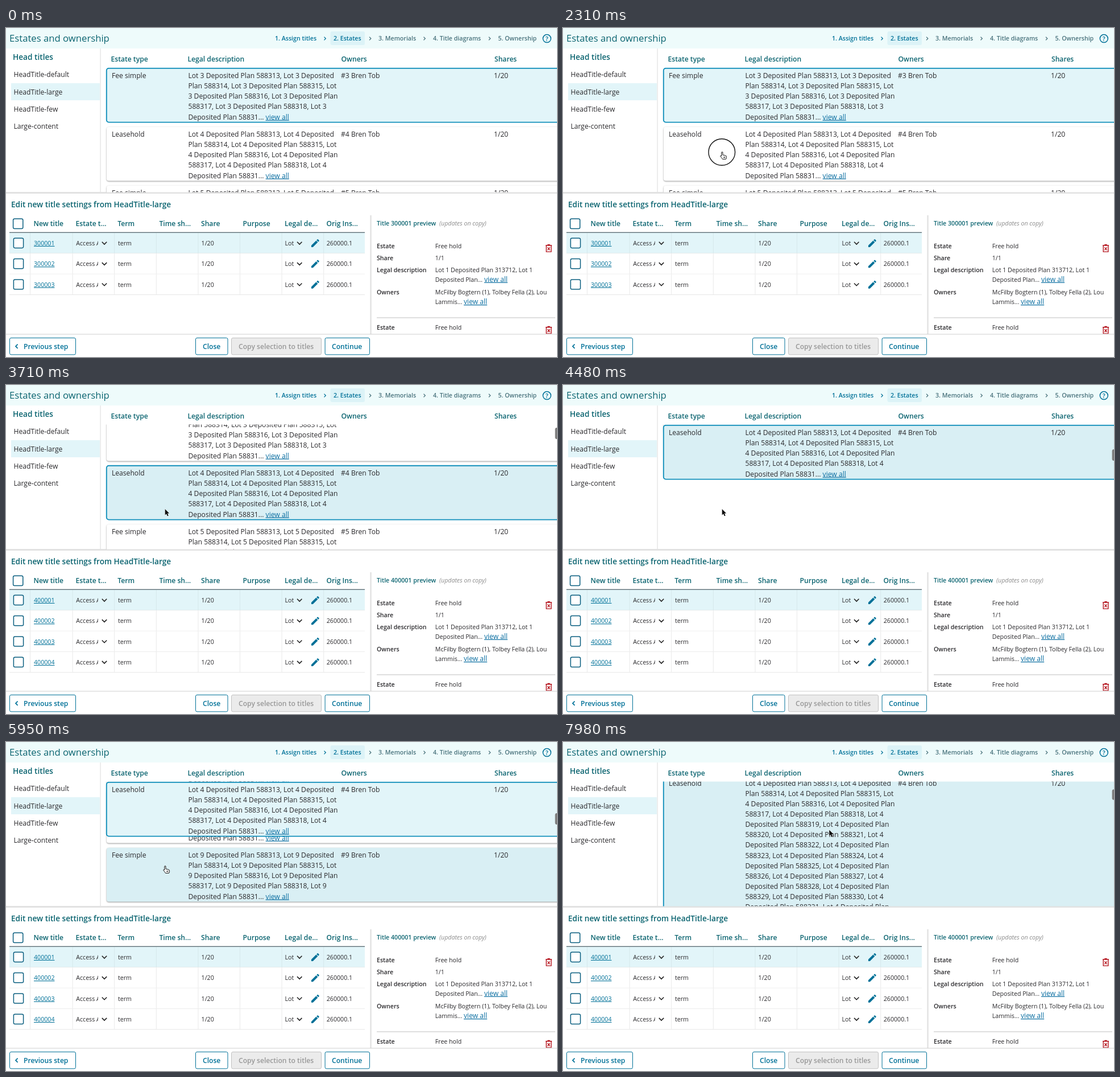
An HTML page that plays this animation: 969x578 px, repeating every 8000 ms.

```html
<!DOCTYPE html>
<html lang="en">
<head>
<meta charset="utf-8">
<title>Estates and ownership</title>
<style>
  html, body { margin: 0; width: 100%; height: 100%; overflow: hidden; background: #fff; }
  svg { display: block; width: 969px; height: 578px; }
  text { font: 12.14px "Open Sans", "Noto Sans", sans-serif; fill: #2a292c; white-space: pre; }
  .b { font-weight: 600; }
  .s { font-size: 10.63px; }
  .l { font-size: 13.66px; }
  .xl { font-size: 16.7px; }
  .i { font-style: italic; fill: #8b8b8b; }
  .teal { fill: #0b6470; }
  .sea { fill: #007198; }
  .dim { fill: #47717b; }
  .off { fill: #989898; }
  .link { font-size: 12.14px; fill: #0a6ea1; text-decoration: underline; }
  .u { fill: #007198; text-decoration: underline; }
  .card { filter: drop-shadow(0 1px 1px rgba(0, 0, 0, .42)); }
</style>
</head>
<body>
<svg viewBox="0 0 969 578">
  <defs>
    <clipPath id="listClip"><rect x="170" y="69.4" width="799" height="219"/></clipPath>
    <clipPath id="previewClip"><rect x="644" y="325" width="325" height="212.5"/></clipPath>
    <clipPath id="typeClip"><rect x="120" y="360" width="42" height="150"/></clipPath>
  </defs>
  <g id="page"></g>
  <g clip-path="url(#listClip)">
    <g id="list"></g>
    <rect id="thumb" x="965.6" width="7" rx="3.2" fill="#7d7d7d"/>
  </g>
  <g id="table"></g>
  <g id="pointer">
    <circle id="ring" r="23.3" fill="none" stroke="#111" stroke-width="1.4"/>
    <path id="hand" d="M-.5 1q0-1.3 1.1-1.3t1.1 1.3v4l4.5 1q2 .5 2 2.2v1q0 2-1 3.2h-6q-1-2-3-4q-1.4-1.4-.4-2q.8-.4 1.7.6zM3.6 8v2.4M5.4 8v2.4"
      fill="#fff" stroke="#111" stroke-linejoin="round"/>
    <path id="arrow" d="M.4 0V10.4L2.8 8.2L4.5 12.2L6.4 11.4L4.7 7.5H7.9Z" fill="#111" stroke="#fff" stroke-width=".8" paint-order="stroke"/>
  </g>
</svg>
<script>
const LOOP = 8000, STEP = 70;
const CLICK_ROW = 2310, SELECT = 2450, RELOAD = 2590;
const SCROLL = 3080, RENDERED = 4560, HOVER_BACK = 4620, HAND_BACK = 4900;
const CLICK_VIEW = 7350, EXPAND = 7560;
const POLAR = '#e2f5f9', HOVER = '#d9eff4', SEA = '#007198', SELECTED = '#1390bb';
const PITCH = 103, TOP = 70.8, CARD = 94.8, LINE = 18.15;

const $ = id => document.getElementById(id);
const range = (n, f) => Array.from({ length: n }, (_, i) => f(i)).join('');
const text = (x, y, s, cls = '') => `<text x="${x}" y="${y}" class="${cls}">${s}</text>`;
const rect = (x, y, w, h, fill, more = '') =>
  `<rect x="${x}" y="${y}" width="${w}" height="${h}" fill="${fill}" ${more}/>`;
const path = (d, color, width) =>
  `<path d="${d}" fill="none" stroke="${color}" stroke-width="${width}"/>`;
const link = s => `<tspan class="link">${s}</tspan>`;
const ease = p => p * p * (3 - 2 * p);
const progress = (t, a, b) => Math.min(1, Math.max(0, (t - a) / (b - a)));

// Monotone curve through [time, value] points
function follow(pts, t) {
  const last = pts.length - 1;
  if (t <= pts[0][0]) return pts[0][1];
  if (t >= pts[last][0]) return pts[last][1];
  const slope = k => k < 0 || k >= last ? 0 :
    (pts[k + 1][1] - pts[k][1]) / (pts[k + 1][0] - pts[k][0]);
  const tangent = k => {
    const a = slope(k - 1), b = slope(k);
    return a * b > 0 ? 2 * a * b / (a + b) : 0;
  };
  const i = pts.findIndex(p => p[0] > t) - 1;
  const [t0, v0] = pts[i], [t1, v1] = pts[i + 1];
  const d = t1 - t0, p = (t - t0) / d, q = 1 - p;
  return v0 * q * q * (1 + 2 * p) + v1 * p * p * (3 - 2 * p)
    + d * p * q * (tangent(i) * q - tangent(i + 1) * p);
}

const scrollDown = [[SCROLL, 0], [3360, 4.6], [3710, 32], [3950, 46], [4030, 47], [4480, 390],
  [4830, 476], [5100, 485], [5500, 490], [5950, 503], [6300, 505]];
const scrollOpen = [[7630, PITCH], [7840, 106.5], [7980, 114.4], [8050, 121]];

function trash(y) {
  return path(`M949 ${y - 5}h11M952.3 ${y - 6.3}h4.4M950.2 ${y - 4.5}v10.6h8.6v-10.6M952.4 ${y - 1.6}l4.2 5M956.6 ${y - 1.6}l-4.2 5`, '#b4131c', 1.4);
}

function button(x, w, label, tx, off) {
  return rect(x + .5, 544.5, w, 29.4, off ? '#ebebeb' : '#fff', `rx="2.5" stroke="${off ? '#c2c2c2' : SEA}"`)
    + text(tx, 563.6, label, 'b ' + (off ? 'off' : 'sea'));
}

function drawPage() {
  const crumbs = [[473, '1. Assign titles', 'sea'], [576, '2. Estates', 'sea'], [655, '3. Memorials', 'dim'],
    [751, '4. Title diagrams', 'dim'], [865.5, '5. Ownership', 'dim']];
  const heads = [[184.5, 'Estate type'], [319.5, 'Legal description'], [589.5, 'Owners'], [859, 'Shares']];
  const items = ['HeadTitle-default', 'HeadTitle-large', 'HeadTitle-few', 'Large-content'];
  const labels = [[386.5, 'Estate'], [407.8, 'Share'], [428.8, 'Legal description'], [468, 'Owners'], [530, 'Estate']];
  const values = [[386.5, 'Free hold'], [407.8, '1/1'], [428.8, 'Lot 1 Deposited Plan 313712, Lot 1'],
    [445.6, 'Deposited Plan... ' + link('view all')], [468, 'McFilby Bogtern (1), Tolbey Fella (2), Lou'],
    [485, 'Lammis... ' + link('view all')], [530, 'Free hold']];

  $('page').innerHTML =
    rect(0, 0, 969, 36, '#eefbfb') + text(6, 24.2, 'Estates and ownership', 'xl teal')
    + rect(570.5, 6, 60.5, 24, '#dcf3f7', 'rx="3"')
    + crumbs.map(([x, s, c]) => text(x, 22.4, s, 's b ' + c)).join('')
    + [561, 640.5, 736, 850.5].map((x, i) => path(`M${x - 1.5} 15.6l2.8 2.9l-2.8 2.9`, i ? '#47717b' : SEA, 1.3)).join('')
    + `<circle cx="951.3" cy="18.6" r="7" fill="none" stroke="${SEA}" stroke-width="1.5"/>`
    + text(948.7, 22.5, '?', 's b sea')
    + rect(165.5, 36, 1.2, 252, '#e2e2e2')
    + text(12, 56.2, 'Head titles', 'l b teal') + rect(9, 97, 156, 30, POLAR)
    + items.map((s, i) => text(13.5, 86.4 + i * 30.3, s)).join('')
    + heads.map(([x, s]) => text(x, 59.3, s, 'b teal')).join('')
    + rect(0, 288, 969, 3, '#e2e2e2')
    + text(9, 314.8, 'Edit new title settings from HeadTitle-large', 'l b teal')
    + rect(640.2, 329, 2.6, 209, '#e4e4e4')
    + '<g clip-path="url(#previewClip)">'
    + labels.map(([y, s]) => text(652, y, s, 's b')).join('')
    + values.map(([y, s]) => text(754.8, y, s, 's')).join('')
    + rect(652, 508.4, 314, 1.2, '#cbcbcb') + trash(387) + trash(530.8) + '</g>'
    + text(762, 347, '(updates on copy)', 's i')
    + rect(0, 537.5, 969, 1, '#cfcfcf')
    + button(6, 116, 'Previous step', 31) + path('M20.6 555.6l-3.6 3.6l3.6 3.6', SEA, 1.7)
    + button(333, 56.5, 'Close', 346) + button(396, 158, 'Copy selection to titles', 409, true)
    + button(560.6, 78.4, 'Continue', 573);
}

function drawTable(series, count) {
  const heads = [[48.5, 'New title'], [122.5, 'Estate t...'], [196.3, 'Term'], [269.5, 'Time sh...'],
    [343, 'Share'], [416.5, 'Purpose'], [490, 'Legal de...'], [563.5, 'Orig Ins...']];
  const box = (x, y) => rect(x, y, 17.2, 17.2, '#fff', 'rx="2.3" stroke="#0b5f80" stroke-width="1.5"');
  const chevron = (x, y) => path(`M${x - 4.2} ${y - 2.2}l4.2 4.2l4.2-4.2`, '#222', 1.6);
  const pencil = y => `<path transform="translate(534.6 ${y - 9.2}) scale(.77)" fill="${SEA}" d="M3 17.25V21h3.75L17.81 9.94l-3.75-3.75zM20.71 7.04a1 1 0 0 0 0-1.41l-2.34-2.34a1 1 0 0 0-1.41 0l-1.83 1.83 3.75 3.75z"/>`;
  const row = i => {
    const top = 359.8 + i * 36.35, mid = top + 18.2, base = mid + 3.9;
    return rect(6, top, 625, 36.35, i ? '#fff' : POLAR) + rect(6, top + 35.6, 625, 1, '#e6e6e6')
      + range(8, k => rect(42 + k * 73.6 + (k ? 1 : 0), top, 1, 36, i ? '#e9e9e9' : '#d6e8ec'))
      + box(13.4, mid - 8.8) + text(49, base, series + '0000' + (i + 1), 's u')
      + `<g clip-path="url(#typeClip)">${text(123.3, base, 'Access A', 's')}</g>` + chevron(173, mid)
      + text(197, base, 'term', 's') + text(343.6, base, '1/20', 's')
      + text(490.5, base, 'Lot', 's') + chevron(516.2, mid) + pencil(mid)
      + text(563.8, base, '260000.1', 's');
  };
  $('table').innerHTML = range(count, row) + rect(6, 358.6, 625, 1.4, '#5d7077')
    + box(12.6, 335.3) + heads.map(([x, s]) => text(x, 348.2, s, 'b teal')).join('')
    + text(652, 347, `Title ${series}00001 preview`, 's b teal');
}

function lotLines(n, open) {
  const lot = `Lot ${n}`, dep = 'Deposited', plan = k => 'Plan 588' + k;
  const lines = [`${lot} ${dep} ${plan(313)}, ${lot} ${dep}`, `${plan(314)}, ${lot} ${dep} ${plan(315)}, Lot`,
    `${n} ${dep} ${plan(316)}, ${lot} ${dep} Plan`, `588317, ${lot} ${dep} ${plan(318)}, ${lot}`];
  if (!open) return [...lines, `${dep} Plan 58831... ${link('view all')}`];
  for (let k = 319; k < 349; k += 3)
    lines.push(`${dep} ${plan(k)}, ${lot} ${dep} Plan`, `588${k + 1}, ${lot} ${dep} ${plan(k + 2)}, ${lot}`);
  return lines;
}

function drawRow(n, y, selected, hovered, open) {
  const lines = lotLines(n, open), base = y + 17.1;
  const height = CARD + (lines.length - 5) * LINE;
  const fill = hovered ? HOVER : selected ? POLAR : '#fff';
  return (selected
    ? rect(176.8, y, 820, height, fill, `rx="4" stroke="${SELECTED}" stroke-width="1.9"`)
    : rect(177, y, 820, height, fill, 'rx="4" class="card"'))
    + text(186, base, n % 2 ? 'Fee simple' : 'Leasehold')
    + lines.map((s, i) => text(320.5, base + i * LINE, s)).join('')
    + text(589, base, `#${n} Bren Tob`) + text(858, base, '1/20');
}

function drawList(t, cursorY) {
  const open = t >= EXPAND, picked = t < SELECT ? 3 : 4;
  const scroll = follow(open ? scrollOpen : scrollDown, t);
  const place = n => {
    const y = TOP + (n - 3) * PITCH - scroll;
    return n === picked && !open ? Math.max(TOP, y) : y;
  };
  const under = n => cursorY >= place(n) && cursorY <= place(n) + CARD;
  const rows = [];
  const lastRow = open ? 4 : t < RENDERED ? 6 : 25;
  for (let n = 3; n <= lastRow; n++)
    if (n !== picked && place(n) < 290 && place(n) > -30) rows.push(n);
  rows.push(picked);

  let hover = 0;
  if (t > CLICK_ROW) {
    if (t < HOVER_BACK || open) hover = 4;
    else hover = under(picked) ? picked : rows.find(under);
  }
  $('list').innerHTML = rows.map(n => drawRow(n, place(n), n === picked, n === hover, open && n === 4)).join('');

  const thumb = $('thumb');
  thumb.setAttribute('y', 71.6 + scroll * (open ? .102 : .106));
  thumb.setAttribute('height', open ? 18.5 : 20);
  thumb.style.opacity = t > SCROLL && t < 6800 ? 1 - progress(t, 6400, 6700) : t >= 7630 ? 1 : 0;
}

function drawPointer(t, x, y) {
  const show = (id, on) => { $(id).style.display = on ? '' : 'none'; };
  const arrow = (t > SCROLL && t < HAND_BACK) || t >= 7630;
  show('pointer', t >= CLICK_ROW);
  show('ring', (t >= CLICK_ROW && t < SELECT) || (t >= CLICK_VIEW && t < EXPAND));
  show('arrow', arrow);
  show('hand', !arrow);
  $('pointer').setAttribute('transform', `translate(${x} ${y})`);
}

let shown = -1, series = 0;
function render(now) {
  const t = Math.floor(now % LOOP / STEP) * STEP;
  if (t !== shown) {
    shown = t;
    const move = ease(progress(t, 6330, 7000));
    const x = 279.3 + 188.5 * move, y = 218 - 63.5 * move;
    const next = t < RELOAD ? 3 : 4;
    if (next !== series) drawTable(series = next, next);
    drawList(t, y);
    drawPointer(t, x, y);
  }
}

drawPage();
render(0);
const start = performance.now();
(function tick() {
  render(performance.now() - start);
  requestAnimationFrame(tick);
})();
</script>
</body>
</html>
```
